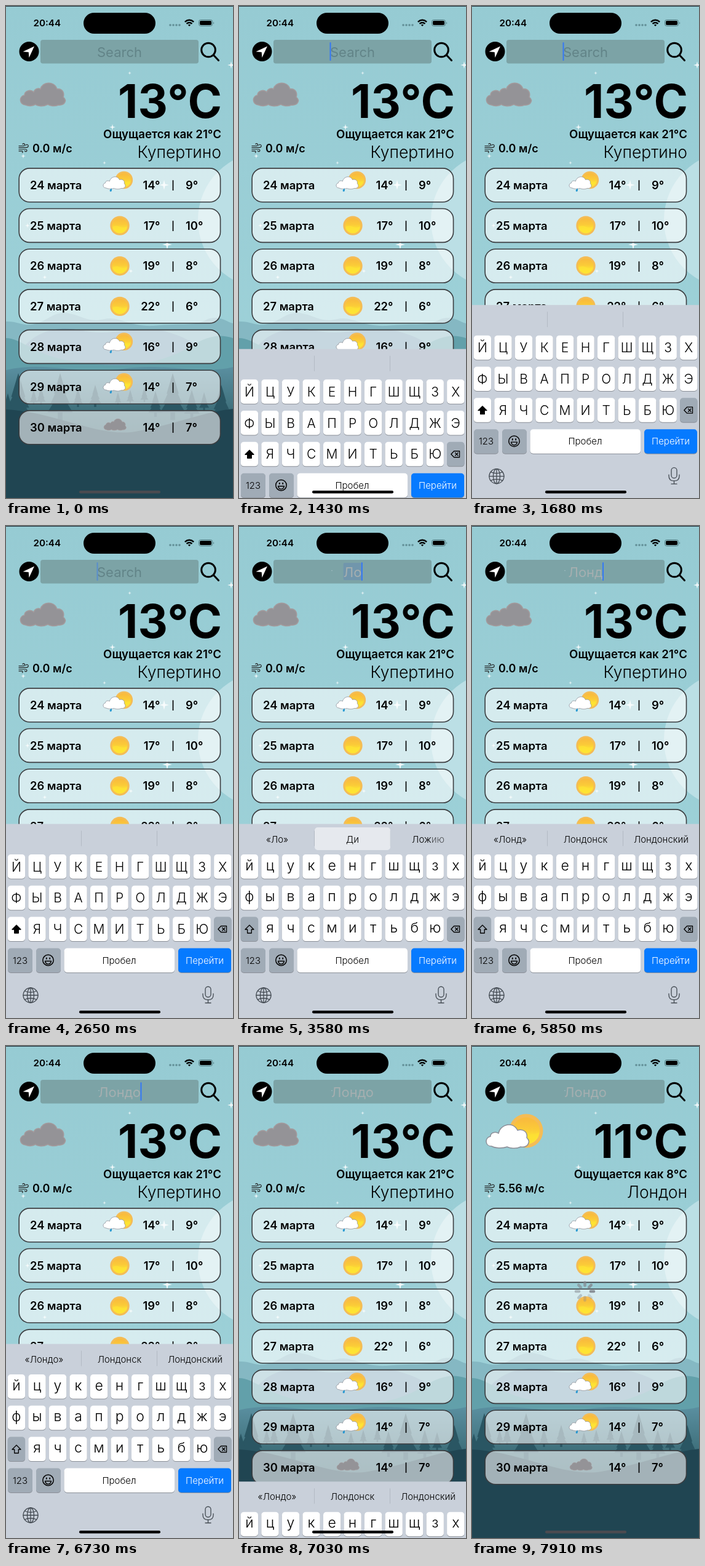
An HTML page that plays this animation: 369 px wide and 800 px high, repeating every 7990 ms.

```html
<!DOCTYPE html>
<html lang="ru">
<head>
<meta charset="utf-8">
<title>Погода</title>
<style>
html, body { margin: 0; width: 100%; height: 100%; overflow: hidden; background: #9bcfd6; }
svg { display: block; width: 369px; height: 800px; font-family: Inter, Roboto, sans-serif; }
.bold { font-weight: 600; font-size: 18.4px; }
.bar { font-size: 14px; text-anchor: middle; }
.end { text-anchor: end; }
.mid { text-anchor: middle; }
.key { font-weight: 300; text-anchor: middle; }
.label { font-size: 15px; font-weight: 350; text-anchor: middle; }
.line { fill: none; stroke: #000; stroke-linecap: round; stroke-linejoin: round; }
</style>
</head>
<body>
<svg viewBox="0 0 369 800">
  <defs>
    <linearGradient id="sky" x1="0" y1="0" x2="0" y2="1">
      <stop offset="0" stop-color="#96cbd3"/><stop offset="1" stop-color="#a0d3da"/>
    </linearGradient>
    <linearGradient id="ground" x1="0" y1="0" x2="0" y2="1">
      <stop offset="0" stop-color="#5a8fa0"/><stop offset=".35" stop-color="#3d6e79"/><stop offset="1" stop-color="#1f4350"/>
    </linearGradient>
    <linearGradient id="disc" x1="0" y1="0" x2="0" y2="1">
      <stop offset=".1" stop-color="#f9bc3d"/><stop offset=".45" stop-color="#fbcb38"/><stop offset=".75" stop-color="#fde534"/>
    </linearGradient>
    <g id="sun">
      <circle r="27.500" fill="#f4bc55"/>
      <circle r="22" fill="url(#disc)"/>
      <path d="M-21 4Q-10-2 0 3T21 3A21.500 21.500 0 0 1-21 4Z" fill="#fee233" opacity=".7"/>
    </g>
    <path id="cloud" fill="#949397" stroke="#a39a9c" stroke-width="1.6" d="M9 37C-1 37-3 23 7 21C7 14 17 11 22 16C24 10 30 9 33 11C36-1 55-3 60 11C70 10 72 19 70 24C77 30 72 38 62 37C56 40 48 38 45 36C38 40 28 39 25 36C20 39 13 39 9 37Z"/>
    <g id="partly">
      <use href="#sun" x="65" y="13"/>
      <path fill="#fff" stroke="#8d8f98" stroke-width="1.5" d="M9 38C-2 38-3 24 7 22C7 15 16 14 20 17C23 2 44-3 51 12C60 9 68 15 66 24C74 32 66 41 56 39C48 43 38 41 34 39C26 42 14 41 9 38Z"/>
    </g>
    <path id="star" fill="#fff" d="M0-1L.2-.2L1 0L.2.2L0 1L-.2.2L-1 0L-.2-.2Z"/>
  </defs>

  <rect width="369" height="800" fill="url(#sky)"/>
  <circle cx="423" cy="348" r="111" fill="#bbdfe5"/>
  <g id="stars" opacity=".85"></g>
  <path fill="#85b8c3" d="M0 513C20 512 30 523 50 516C70 510 75 499 95 499C120 500 130 516 160 509C185 504 200 522 240 520C290 515 305 522 328 509C348 502 360 515 369 516V800H0Z"/>
  <path fill="#759fb4" d="M24 560C50 525 90 520 125 528C170 538 220 518 262 530C300 540 320 560 345 570V620H24Z"/>
  <path fill="#62a0aa" d="M0 540C25 540 50 570 110 578C180 588 240 588 300 554C330 534 350 534 369 540V800H0Z"/>
  <path fill="url(#ground)" d="M0 592C60 577 120 600 190 590C260 580 320 600 369 587V800H0Z"/>
  <g id="trees" fill="#2a5663"></g>
  <path fill="#204552" d="M0 656C80 660 150 702 210 692C270 682 320 660 369 655V800H0Z"/>
  <rect width="369" height="1" fill="#22313c"/>

  <text class="bold" x="44.500" y="33" style="font-size:15.2px">20:44</text>
  <rect x="126" y="11" width="117" height="34" rx="17"/>
  <g fill="#628f97"><circle cx="267" cy="31" r="1.8"/><circle cx="272" cy="31" r="1.8"/><circle cx="277" cy="31" r="1.8"/><circle cx="282" cy="31" r="1.8"/></g>
  <g class="line" stroke-width="2.4" style="stroke-linecap:butt">
    <path d="M290.800 25.800Q298 19.500 305.200 25.800M293.500 28.800Q298 25 302.500 28.800"/>
    <path d="M298 33L295.800 30.800Q298 29 300.200 30.800Z" fill="#000" stroke="none"/>
  </g>
  <rect x="313.500" y="22.500" width="22" height="10" rx="3" fill="none" stroke="#4f777d"/>
  <rect x="315" y="24" width="19" height="7" rx="1.800"/>
  <path d="M337 25.500Q338.800 27.500 337 29.500Z" fill="#4f777d"/>

  <circle cx="37.500" cy="74" r="16"/>
  <path fill="#fff" d="M46 65.500L27.500 74.200L36.700 74.900L37.500 84Z"/>
  <rect x="56" y="55" width="257" height="38.500" rx="4" fill="#7ca3a6"/>
  <circle cx="151" cy="72.500" r=".8" fill="#a9c3c5"/>
  <rect id="mark" y="60" height="28" rx="2" fill="#7196ac"/>
  <text id="query" class="mid" x="184.500" y="82.500" font-size="22"></text>
  <rect id="caret" y="59" width="2" height="30" rx="1" fill="#3478f6"/>
  <g class="line" stroke-width="3"><circle cx="329" cy="71.500" r="11.300"/><path d="M337.500 80L345.500 88.500"/></g>

  <use id="cloudNow" href="#cloud" x="23" y="124"/>
  <use id="partlyNow" href="#partly" x="23" y="125"/>
  <text id="temp" class="end" x="351" y="182" font-size="75" font-weight="700"></text>
  <text id="feels" class="bold end" x="350" y="215" style="font-size:18.6px"></text>
  <text id="city" class="end" x="350" y="247" font-size="26.500" font-weight="300"></text>
  <g class="line" stroke-width="1.200" style="stroke:#222">
    <path d="M21 227.500H28Q31 227 30.500 224.800Q29 222.500 27 224.500M21 230.200H33.500Q37 229.500 36 226.500Q34 224 32 226.500M21 233H31.500Q35 233.500 33.500 236.300Q31.500 237.500 30.500 235.500M21 235.800H26Q28 236.500 26.500 238.500"/>
  </g>
  <text id="wind" class="bold" x="43" y="237.500" style="font-size:18px"></text>
  <g id="rows"></g>
  <g id="spinner" stroke="#83888f" stroke-width="4.600" stroke-linecap="round"></g>

  <g id="board">
    <rect width="369" height="330" fill="#c9d0da"/>
    <path d="M122.500 11V36M245.500 11V36" stroke="#b3bac4"/>
    <rect id="pick" x="123" y="5.500" width="123" height="37" rx="5" fill="#fff" opacity=".55"/>
    <text id="s0" class="label" x="62" y="30"></text>
    <text id="s1" class="label" x="184.500" y="30"></text>
    <text class="label" x="307.500" y="30"><tspan id="s2"></tspan><tspan id="tail"></tspan></text>
    <g id="keys"></g>
    <path id="shift" stroke="#000" stroke-linejoin="round" stroke-width="1.300" d="M17 164.500L24 171.500H20.300V177.500H13.700V171.500H10Z"/>
    <g class="line" stroke-width="1.300">
      <path d="M349.500 166H358.500V176H349.500L344.800 171ZM351.500 168.800L356 173.300M356 168.800L351.500 173.300"/>
      <circle cx="68.500" cy="221.500" r="8.700" stroke-width="1.500"/>
      <path d="M63.500 223H73.500Q72.500 227.800 68.500 227.800T63.500 223Z"/>
      <path d="M65.800 217.800V219.300M71.200 217.800V219.300" stroke-width="1.800"/>
    </g>
    <text class="label" x="23" y="227">123</text>
    <text class="label" x="184" y="227">Пробел</text>
    <text class="label" x="323" y="227" fill="#fff">Перейти</text>
    <g class="line" stroke-width="1.300" style="stroke:#434a52">
      <circle cx="40" cy="278.500" r="12"/><ellipse cx="40" cy="278.500" rx="5.500" ry="12"/>
      <path d="M40 266.500V290.500M28 278.500H52M30.500 271.500Q40 276 49.500 271.500M30.500 285.500Q40 281 49.500 285.500"/>
      <rect x="324" y="264.500" width="9" height="17" rx="4.500"/>
      <path d="M320 276V278Q320 286 328.500 286T337 278V276M328.500 286V291M324 291H333"/>
    </g>
  </g>
  <rect id="home" x="119" y="788" width="132" height="4.500" rx="2.200"/>
</svg>

<script>
const LOOP = 7990, FOCUS = 1420, RISE = 1278, ENTER = 6895, SPIN = 7450, LOADED = 7700;
const PITCH = 33.53, KEY_W = 28.3, TOP = 484.5, TRAVEL = 315.5;
const $ = id => document.getElementById(id);
const set = (id, attrs) => { for (const k in attrs) $(id).setAttribute(k, attrs[k]); };
const write = (id, s) => { if ($(id).textContent !== s) $(id).textContent = s; };
const clamp = v => Math.min(1, Math.max(0, v));

// Scenery
$('stars').innerHTML = [[257, 291, 8], [262, 388, 8], [173, 197, 5], [366, 96, 6], [28, 244, 4], [201, 109, 3],
  [63, 441, 3.5], [203, 431, 3.5], [35, 357, 4], [160, 255, 3]]
  .map(([x, y, r]) => `<use href="#star" transform="translate(${x} ${y}) scale(${r})"/>`).join('');

function tree(x, top, h) {
  let d = `M${x - h * .05} ${top + h}V${top + h * .8}H${x + h * .05}V${top + h}Z`;
  for (let i = 0; i < 3; i++) {
    const w = h * (.13 + i * .07), y = top + h * i * .2;
    d += `M${x} ${y}L${x + w} ${y + h * .44}H${x - w}Z`;
  }
  return `<path d="${d}"/>`;
}
$('trees').innerHTML = [[20, 597, 88], [88, 597, 76], [271, 597, 76], [243, 626, 42], [302, 624, 46], [350, 616, 62], [3, 630, 55],
  [45, 624, 24], [57, 620, 28], [117, 622, 30], [145, 616, 36], [182, 628, 20], [202, 624, 22], [225, 620, 24], [322, 628, 30]]
  .map(a => tree(...a)).join('');

// Forecast
const icons = {
  partly: '<use href="#partly" transform="translate(158 12.5) scale(.52)"/><path d="M171.500 32.500Q167 36 169.500 38Q173 38.500 171.500 32.500Z" fill="#2496d0"/>',
  sun: '<use href="#sun" transform="translate(185 27.700) scale(.57)"/>',
  cloud: '<use href="#cloud" transform="translate(159 13) scale(.495)"/>'
};
const days = [['partly', 14, 9], ['sun', 17, 10], ['sun', 19, 8], ['sun', 22, 6], ['partly', 16, 9], ['partly', 14, 7], ['cloud', 14, 7]];
$('rows').innerHTML = days.map(([icon, hi, lo], i) => `<g class="bold" transform="translate(0 ${263.7 + i * 65.67})">
  <rect x="21.200" y=".2" width="327.300" height="54.800" rx="17" fill="#fff" fill-opacity=".59" stroke="#3b3d40" stroke-width="1.600"/>
  <text x="39" y="34.300">${24 + i} марта</text>${icons[icon]}
  <text class="end" x="250.500" y="34.300">${hi}°</text><text class="bar" x="271.500" y="33.500">|</text>
  <text x="292" y="34.300">${lo}°</text></g>`).join('');

$('spinner').innerHTML = Array.from({ length: 8 }, (_, i) =>
  `<path d="M183.500 389.500V384.500" transform="rotate(${i * 45} 183.500 399)"/>`).join('');

// Keyboard
const key = (x, y, w, fill, id = '') => `<rect x="${x}" y="${y + 1}" width="${w}" height="39.500" rx="5" fill="#8b9098"/>
  <rect id="${id}" x="${x}" y="${y}" width="${w}" height="39.500" rx="5" fill="${fill}"/>`;
const GREY = '#a0abb6';
let keys = '';
['ЙЦУКЕНГШЩЗХ', 'ФЫВАПРОЛДЖЭ', ' ЯЧСМИТЬБЮ '].forEach((row, r) => [...row].forEach((ch, i) => {
  const x = 2.8 + i * PITCH, y = 49.5 + r * 50.8;
  if (ch === ' ') keys += key(x, y, KEY_W, GREY, i ? 'del' : 'shiftKey');
  else keys += key(x, y, KEY_W, '#fff') + `<text class="key" data-ch="${ch}" x="${x + KEY_W / 2}" data-y="${y}"></text>`;
}));
keys += key(3, 202, 40, GREY) + key(49, 202, 40, GREY) + key(94.5, 202, 179.5, '#fff') + key(280, 202, 86, '#067aff');
$('keys').innerHTML = keys;
const caps = [...document.querySelectorAll('[data-ch]')];

let shifted = null;
function setShift(up) {
  if (up === shifted) return;
  shifted = up;
  for (const c of caps) {
    c.textContent = up ? c.dataset.ch : c.dataset.ch.toLowerCase();
    c.setAttribute('y', +c.dataset.y + (up ? 27.5 : 25.5));
    c.setAttribute('font-size', up ? 21 : 23);
  }
  set('shiftKey', { fill: up ? '#fff' : GREY });
  set('shift', { fill: up ? '#000' : 'none' });
}

// Typing: time, field text, three suggestions
const steps = [
  [0, '', '', '', ''],
  [2750, 'Л', '«Л»', '', ''],
  [3500, 'Ло', '«Ло»', 'Ди', 'Лож'],
  [4400, 'Лон', '«Лон»', 'Лондонск', 'Лондонский'],
  [5300, 'Лонд', '«Лонд»', 'Лондонск', 'Лондонский'],
  [6200, 'Лондо', '«Лондо»', 'Лондонск', 'Лондонский']
];

const spring = ms => { const x = Math.max(0, ms) * .01826; return 1 - (1 + x) * Math.exp(-x); };

function blink(ms) {
  const p = ms % 1320;
  return p < 600 ? 1 : p < 1150 ? 1 - clamp((p - 600) / 170) : clamp((p - 1150) / 170);
}

function render(t) {
  const step = steps.filter(s => s[0] <= t).pop(), [at, typed, a, b, c] = step;
  const picking = typed === 'Ло';

  write('query', typed || 'Search');
  set('query', { fill: typed ? '#a5afb0' : '#628488' });
  const half = $('query').getComputedTextLength() / 2;
  const focused = t >= RISE - 50 && t < ENTER - 20;
  set('caret', { x: typed ? 184 + half : 147.5, opacity: focused ? blink(Math.max(0, t - Math.max(at, FOCUS))) : 0 });
  set('mark', { x: 184.5 - half, width: half * 2, opacity: picking ? 1 : 0 });

  write('s0', a); write('s1', b); write('s2', c);
  write('tail', picking && t < 3700 ? 'ию' : '');
  set('tail', { opacity: clamp((3700 - t) / 200) });
  set('pick', { opacity: picking ? .55 : 0 });
  setShift(!typed);

  const lift = t < ENTER ? spring(t - RISE) : 1 - spring(t - ENTER);
  const y = TOP + TRAVEL * (1 - lift);
  set('board', { transform: `translate(0 ${y.toFixed(2)})` });
  set('home', { fill: y < 788 ? '#000' : '#4b4b50' });

  const done = t >= LOADED;
  write('temp', done ? '11°C' : '13°C');
  write('feels', 'Ощущается как ' + (done ? '8°C' : '21°C'));
  write('city', done ? 'Лондон' : 'Купертино');
  write('wind', (done ? '5.56' : '0.0') + ' м/с');
  set('cloudNow', { opacity: done ? 0 : 1 });
  set('partlyNow', { opacity: done ? 1 : 0 });

  set('spinner', { opacity: t >= SPIN ? 1 : 0 });
  const head = Math.floor((t - 7880) / 100) + 802;
  [...$('spinner').children].forEach((p, i) => p.setAttribute('opacity', .9 - ((head - i) % 8) * .095));
}

const start = performance.now();
function frame() {
  render((performance.now() - start) % LOOP);
  requestAnimationFrame(frame);
}
frame();
</script>
</body>
</html>
```
